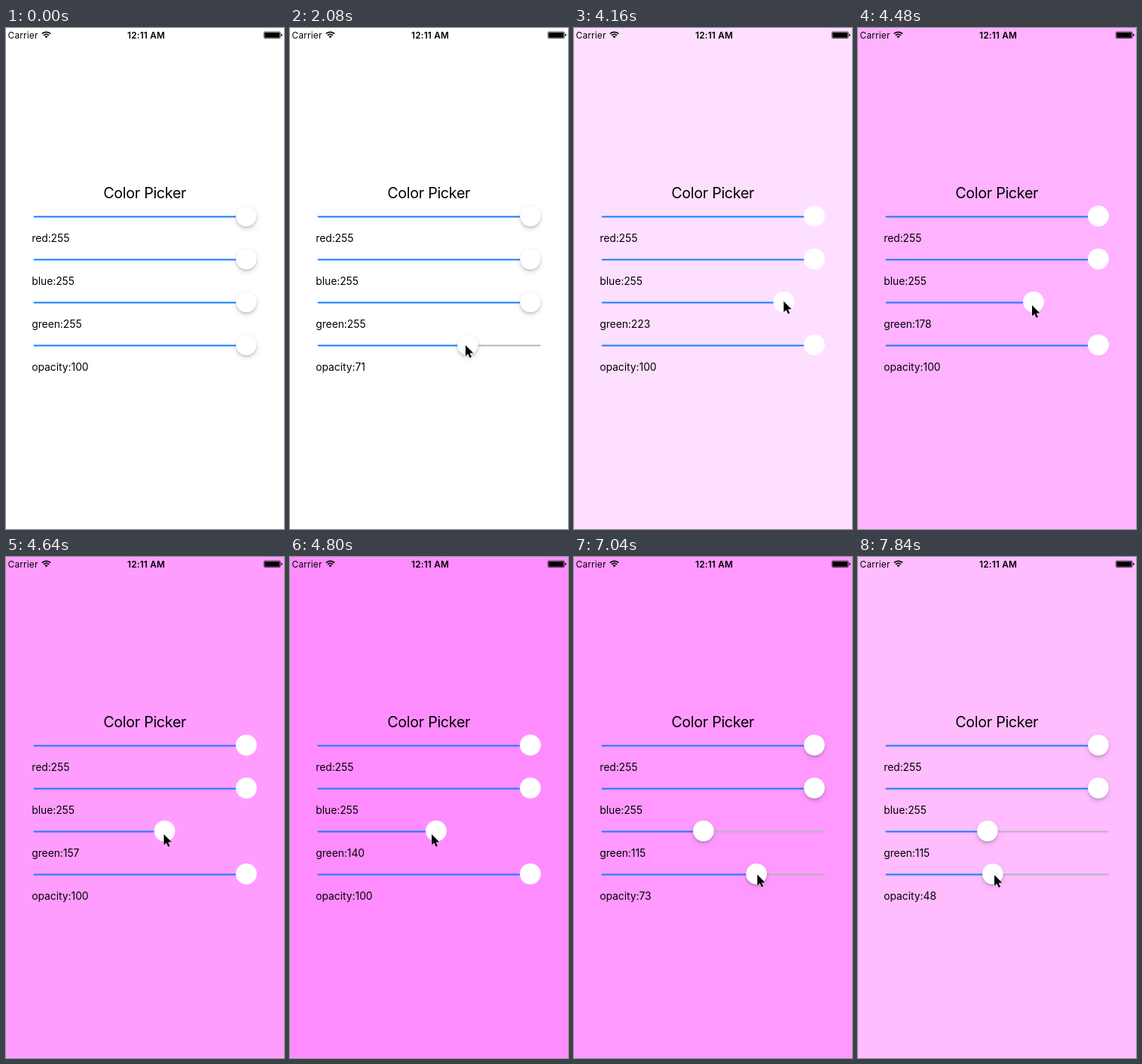
Animation, 369 px wide and 665 px high, one loop 8 s. Source, as an HTML page:

```html
<!DOCTYPE html>
<html lang="en">
<head>
<meta charset="utf-8">
<title>Color Picker</title>
<style>
  html, body { margin: 0; width: 100%; height: 100%; overflow: hidden; background: #fff; }
  svg { display: block; width: 369px; height: 665px; font-family: Inter, Roboto, sans-serif; }
  .status { font-size: 11.8px; letter-spacing: .2px; }
  .clock { font-weight: 600; text-anchor: middle; }
  .title { font-size: 19.7px; letter-spacing: -.3px; text-anchor: middle; }
  .label { font-size: 13.8px; }
  .rest { fill: #b6b6b8; }
  .done { fill: #147efb; }
  .thumb { fill: #fff; }
  .soft .thumb {
    stroke: rgba(0, 0, 0, .05); stroke-width: .6;
    filter: drop-shadow(0 2px 1px rgba(0, 0, 0, .13)) drop-shadow(0 3px 3px rgba(0, 0, 0, .13));
  }
  .flat .rest { display: none; }
</style>
</head>
<body>
<svg id="stage" class="soft" viewBox="0 0 369 665">
  <rect id="back" width="369" height="665" fill="#fff"/>
  <text class="status" x="2.6" y="13.6">Carrier</text>
  <g fill="none" stroke="#000" stroke-width="1.7">
    <path d="M47.8 7.6a8.2 8.2 0 0 1 11.4 0"/>
    <path d="M50 9.9a5 5 0 0 1 7 0"/>
  </g>
  <path d="M53.5 13.4l-2-2.1a2.9 2.9 0 0 1 4 0z"/>
  <text class="status clock" x="186" y="13.6">12:11 AM</text>
  <rect x="342.4" y="5" width="21.8" height="8.6" rx="1.4" fill="none" stroke="#000" stroke-width=".7"/>
  <rect x="343.3" y="5.9" width="20" height="6.8" rx=".6"/>
  <path d="M365.2 7.7q1.6 .3 1.6 1.6t-1.6 1.6z"/>
  <text class="title" x="184.2" y="226">Color Picker</text>
  <g id="sliders"></g>
  <path id="cursor" d="M0 0V14.6L3.3 11.5L5.7 16.8L8 15.8L5.7 10.6H10.4Z" stroke="#fff" stroke-width="1" paint-order="stroke" stroke-linejoin="round"/>
</svg>
<script>
const LOOP = 8000, STEP = 160, LABEL_LAG = 40;
const LEFT = 51, TRAVEL = 268;

// rows: time, value
const OPACITY = [
  [1280, 100], [1440, 97], [1920, 77], [2080, 69], [2400, 58], [2560, 60],
  [3000, 100], [6080, 100], [6240, 98], [7680, 50], [7840, 47.7]
];
const GREEN = [
  [3520, 255], [3680, 252], [3840, 242.5], [4000, 240.7], [4320, 192.4],
  [4480, 173.2], [4640, 151.7], [4800, 136.1], [5120, 118], [5240, 115]
];
// rows: time, x, y
const POINTER = [
  [320, 266, 452], [640, 288, 394], [960, 316, 421], [1280, 316, 421],
  [1440, 308, 421], [1920, 254, 421], [2080, 233, 421], [2400, 203, 421],
  [2560, 209, 421], [3040, 330, 421], [3200, 354, 400], [3520, 317, 361],
  [3840, 303, 360], [4000, 302, 360], [4480, 231, 368], [4800, 188, 368],
  [5240, 166, 368], [5440, 166, 368], [6080, 322, 421], [6240, 315, 421],
  [7680, 186, 422], [7840, 181, 422]
];

function sample(rows, t, col = 1) {
  const i = rows.findIndex(r => r[0] > t);
  if (i === 0) return rows[0][col];
  if (i < 0) return rows[rows.length - 1][col];
  const a = rows[i - 1], b = rows[i];
  return a[col] + (b[col] - a[col]) * (t - a[0]) / (b[0] - a[0]);
}

const byId = id => document.getElementById(id);
const stage = byId('stage'), back = byId('back'), cursor = byId('cursor');

function add(tag, attrs, parent) {
  const el = document.createElementNS('http://www.w3.org/2000/svg', tag);
  for (const k in attrs) el.setAttribute(k, attrs[k]);
  return parent.appendChild(el);
}

function makeSlider(name, max, rows, index) {
  const g = add('g', { transform: `translate(0 ${249.6 + index * 57})` }, byId('sliders'));
  const rest = add('rect', { class: 'rest', y: -.1, height: 2, rx: 1 }, g);
  const done = add('rect', { class: 'done', x: 36.5, y: -.1, height: 2, rx: 1 }, g);
  const thumb = add('circle', { class: 'thumb', r: 13.9 }, g);
  const label = add('text', { class: 'label', x: 34.2, y: 34.6 }, g);
  return t => {
    const x = LEFT + TRAVEL * sample(rows, t) / max;
    const shown = Math.round(sample(rows, t - LABEL_LAG));
    rest.setAttribute('x', x);
    rest.setAttribute('width', 333 - x);
    done.setAttribute('width', x - 36.5);
    thumb.setAttribute('cx', x);
    label.textContent = `${name}:${shown}`;
    return shown;
  };
}

const FULL = [[0, 255]];
const sliders = [
  ['red', 255, FULL], ['blue', 255, FULL], ['green', 255, GREEN], ['opacity', 100, OPACITY]
].map((s, i) => makeSlider(...s, i));

function draw(time) {
  const t = Math.floor(time % LOOP / STEP) * STEP;
  const [red, blue, green, opacity] = sliders.map(update => update(t));
  const mix = v => Math.round(255 - (255 - v) * opacity / 100);
  back.setAttribute('fill', `rgb(${mix(red)},${mix(green)},${mix(blue)})`);

  // shadows and empty tracks drop out while green is dragged far
  const flat = t >= 4160 && t < 5600;
  stage.setAttribute('class', flat ? 'flat' : 'soft');

  cursor.setAttribute('visibility', t < 320 ? 'hidden' : 'visible');
  cursor.setAttribute('transform', `translate(${sample(POINTER, t)} ${sample(POINTER, t, 2)})`);
}

const start = performance.now();
function tick() {
  draw(performance.now() - start);
  requestAnimationFrame(tick);
}
tick();
</script>
</body>
</html>
```
